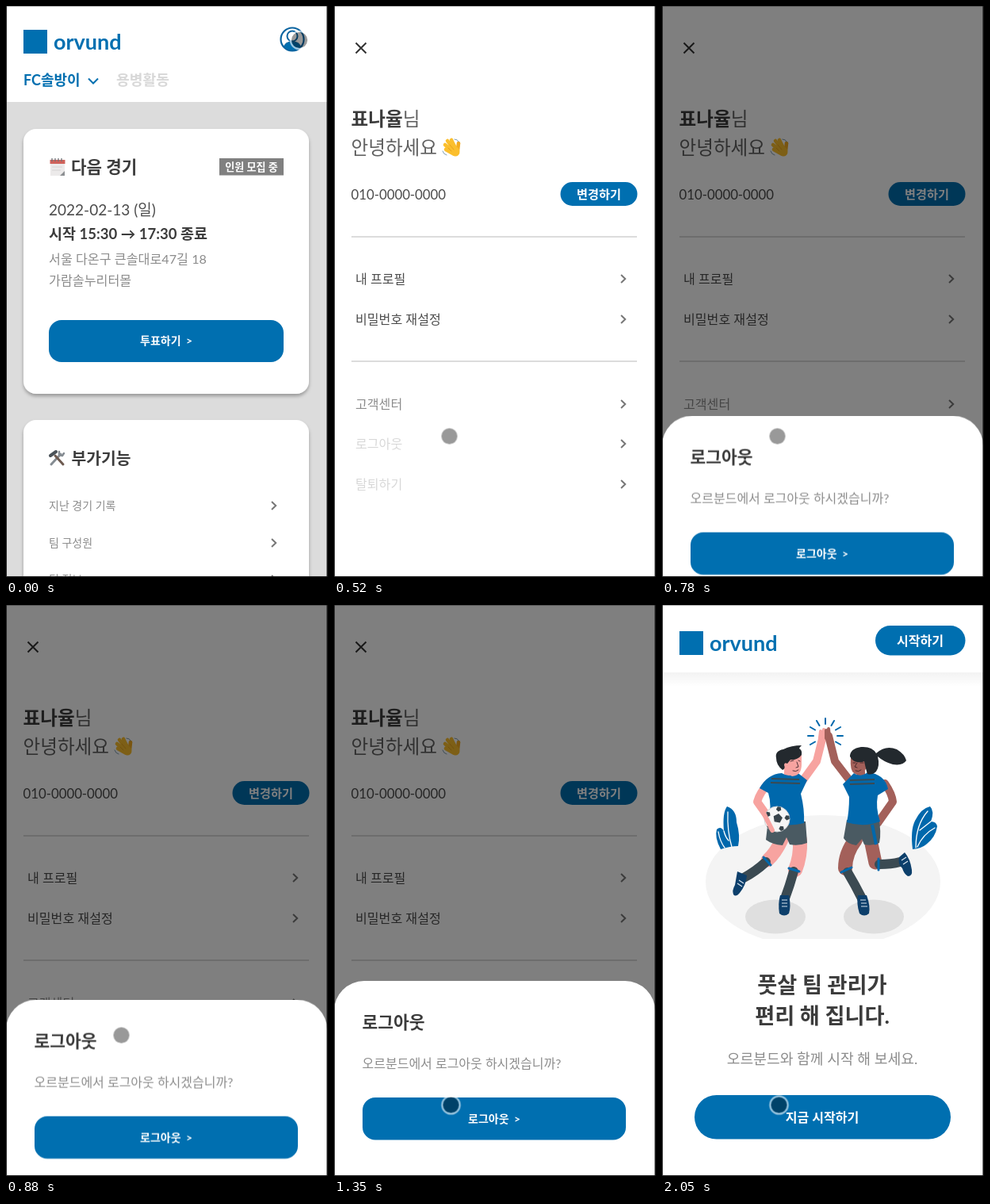
An HTML page for the animation above (2.42 s loop, 406 by 720 pixels).

```html
<!DOCTYPE html>
<html lang="ko">
<head>
<meta charset="utf-8">
<title>Logout flow</title>
<style>
html, body { margin: 0; width: 100%; height: 100%; overflow: hidden; background: #fff; }
svg { display: block; width: 100vw; height: 100vh; }
text { font-family: Lato, "Noto Sans CJK KR", "Noto Sans KR", "Noto Sans CJK", sans-serif; white-space: pre; }
.b { font-weight: 700; }
.c { text-anchor: middle; }
.dark { fill: #3c3c3c; }
.soft { fill: #4c4c4c; }
.thin { fill: #606060; font-weight: 300; }
.mid { fill: #8c8c8c; }
.pale { fill: #d8d8d8; }
.white { fill: #fff; }
.blue { fill: #006fb0; }
.line { fill: none; stroke-linecap: round; stroke-linejoin: round; }
.pink { stroke: #f7a3a0; }
.brown { stroke: #a3605a; }
.sock { stroke: #3b4a52; }
.band { stroke: #0068ac; stroke-width: 3; }
.shoe { fill: #0d3f6b; }
.shirt { fill: #0068ac; }
.shorts { fill: #4a5a62; }
.hair { fill: #23292e; }
</style>
</head>
<body>
<svg viewBox="0 0 406 720" preserveAspectRatio="none">
<defs>
  <path id="go" d="M-3-5 2.2 0-3 5" fill="none" stroke="#777" stroke-width="2"/>
  <g id="logo">
    <rect x="22" y="30" width="30" height="30" class="blue"/>
    <text x="60" y="55" font-size="27" class="b blue">orvund</text>
  </g>
  <filter id="blur" x="-10%" y="-10%" width="120%" height="130%">
    <feDropShadow dx="0" dy="3" stdDeviation="2" flood-opacity=".3"/>
  </filter>
  <linearGradient id="fade" x2="0" y2="1">
    <stop stop-color="#000" stop-opacity=".05"/><stop offset="1" stop-color="#000" stop-opacity="0"/>
  </linearGradient>
  <clipPath id="floor"><rect y="240" width="406" height="181"/></clipPath>
</defs>

<g id="home">
  <rect width="406" height="720" fill="#dcdcdc"/>
  <rect width="406" height="121" class="white"/>
  <use href="#logo"/>
  <g class="blue" stroke="#0b64a0">
    <circle cx="361" cy="42" r="14.500" fill="#fff" stroke-width="2.200"/>
    <path d="M350.500 51q2-6 10.500-6t10.500 6q-4 5-10.500 5t-10.500-5z"/>
    <circle cx="361" cy="38" r="6.500" fill="#fff" stroke-width="2"/>
  </g>
  <text x="22" y="100" font-size="18" class="b blue">FC솔방이</text>
  <path d="M104 91.500l6 6 6-6" fill="none" stroke="#006fb0" stroke-width="2"/>
  <text x="139" y="100" font-size="18.200" class="b pale">용병활동</text>

  <rect x="22" y="155" width="360" height="334" rx="16" class="white" filter="url(#blur)"/>
  <g id="calendar">
    <path d="M56 196h18v13l-5 5H56z" fill="#eceaea"/>
    <path d="M74 208v6h-6z" fill="#8c8f92"/>
    <path d="M55.500 194h19v5h-19z" fill="#cf625b"/>
    <path d="M58 192v4m4-4v4m4-4v4m4-4v4" stroke="#6c7176" stroke-width="1.300"/>
    <path d="M58 203h13m-13 4h11" stroke="#d6d3d3"/>
  </g>
  <text x="82" y="211" font-size="21.200" class="b dark">다음 경기</text>
  <rect x="269" y="192" width="81" height="21.500" fill="#808080"/>
  <text x="309.500" y="207.500" font-size="13.100" class="b white c">인원 모집 중</text>
  <text x="54" y="264" font-size="19" class="soft">2022-02-13 (일)</text>
  <text x="54" y="294" font-size="18.500" class="b dark">시작 15:30 → 17:30 종료</text>
  <text x="54" y="324.500" font-size="16.200" class="mid">서울 다온구 큰솔대로47길 18</text>
  <text x="54" y="352" font-size="16.200" class="mid">가람솔누리터몰</text>
  <rect x="54" y="396" width="296" height="53" rx="16" class="blue"/>
  <text x="169" y="426.500" font-size="14" class="b white">투표하기</text>
  <text x="227" y="426.500" font-size="14" class="b white">&gt;</text>

  <rect x="22" y="522" width="360" height="240" rx="16" class="white" filter="url(#blur)"/>
  <g class="line" stroke="#858c92" stroke-width="3">
    <path d="M57 578l12-13"/>
    <path d="M67 562v4l4 1 2-3" stroke-width="2.500"/>
    <path d="M72 578l-10-11" stroke="#6d5a50"/>
    <path d="M56 567l7-5" stroke="#4b5359" stroke-width="4"/>
  </g>
  <text x="82.500" y="577.500" font-size="20.400" class="b dark">부가기능</text>
  <g font-size="14" class="mid">
    <text x="54" y="635">지난 경기 기록</text>
    <text x="54" y="681.500">팀 구성원</text>
    <text x="54" y="728">팀 정보</text>
  </g>
  <use href="#go" x="338" y="630"/><use href="#go" x="338" y="677"/><use href="#go" x="338" y="723"/>
</g>

<g id="menu">
  <rect width="406" height="720" class="white"/>
  <path d="M27.500 46.500l13 13m0-13l-13 13" stroke="#333" stroke-width="2"/>
  <text x="21.500" y="151" font-size="23.600" class="thin"><tspan class="b dark">표나율</tspan>님</text>
  <text x="21.500" y="187" font-size="23.600" class="thin">안녕하세요</text>
  <g class="line" stroke="#fbbf2d" stroke-width="4.600" transform="translate(147 178)">
    <path d="M2 5l-9-8M4 3l-8-11M6 1l-5-10M1 7l-7-4"/>
    <path d="M9 4l1-9" stroke="#f3ac20"/>
    <ellipse cx="5" cy="5" rx="6" ry="5" fill="#fbbf2d" stroke-width="2" transform="rotate(45 5 5)"/>
    <path d="M-3 1l4 4M-1-3l5 6" stroke="#e29a1b" stroke-width=".8"/>
    <path d="M-10 5q1 4 5 5M5-10q4 0 5 3" stroke="#7f9fb3" stroke-width="1"/>
  </g>
  <text x="21.500" y="243.500" font-size="16.800" class="soft">010-0000-0000</text>
  <rect x="285.500" y="222" width="97" height="30" rx="15" class="blue"/>
  <text x="334" y="242.500" font-size="15.200" class="b white c">변경하기</text>
  <path d="M22 291h360M22 448h360" stroke="#dcdcdc" stroke-width="2"/>
  <g font-size="16.100">
    <text x="27" y="350" class="soft">내 프로필</text>
    <text x="27" y="401" class="soft">비밀번호 재설정</text>
    <text x="27" y="508" class="mid">고객센터</text>
    <text x="27" y="609" class="pale">탈퇴하기</text>
    <g id="logout"><text x="27" y="558" class="pale">로그아웃</text><use href="#go" x="365" y="552"/></g>
  </g>
  <use href="#go" x="365" y="344"/><use href="#go" x="365" y="395"/>
  <use href="#go" x="365" y="502"/><use href="#go" x="365" y="603"/>
</g>

<rect id="shade" width="406" height="720" opacity="0" fill-opacity=".5"/>

<g id="sheet">
  <path d="M0 720V512a38 38 0 0 1 38-38H367a38 38 0 0 1 38 38V720z" class="white"/>
  <text x="35.500" y="534" font-size="21.500" class="b dark">로그아웃</text>
  <text x="35.500" y="584" font-size="16" class="mid">오르분드에서 로그아웃 하시겠습니까?</text>
  <rect x="36" y="621" width="332" height="53.500" rx="16" class="blue"/>
  <text x="169" y="652.500" font-size="14" class="b white">로그아웃</text>
  <text x="227" y="652.500" font-size="14" class="b white">&gt;</text>
</g>

<g id="landing">
  <rect width="406" height="720" class="white"/>
  <rect y="85" width="406" height="18" fill="url(#fade)"/>
  <use href="#logo" y="3"/>
  <rect x="269" y="26" width="113.500" height="37.500" rx="18.700" class="blue"/>
  <text x="325.500" y="50.500" font-size="16.100" class="b white c">시작하기</text>

  <g id="art">
    <ellipse cx="203" cy="349" rx="148" ry="84" fill="#f4f4f4" clip-path="url(#floor)"/>
    <g fill="#dfdfdf"><ellipse cx="143" cy="393" rx="38" ry="21.500"/><ellipse cx="267" cy="393" rx="38" ry="21.500"/></g>
    <g id="burst" class="line" stroke="#0068ac" stroke-width="2"></g>
    <g class="shirt">
      <path d="M74 308q-8-15-5-25 5-5 9 2-2-23 4-31 12 4 12 20 5 16 2 30-10 0-22 4z"/>
      <path d="M316 308q-3-24 3-36 8-16 19-18 6 6 1 19 7 0 8 6-2 14-14 23-6 5-17 6z"/>
    </g>
    <g class="line" stroke="#fff" stroke-width="1.300">
      <path d="M83 261q-1 24 5 44M71 286q2 12 8 20M78 285q2 8 6 12"/>
      <path d="M335 260q-15 17-15 46M344 281q-15 8-22 24M339 273l-14 11"/>
    </g>

    <g id="man">
      <g class="line">
        <path d="M134 225q-11 12-14 23l17 24" class="pink" stroke-width="10"/>
        <path d="M177 222l18-25 8-32" class="pink" stroke-width="10"/>
        <path d="M199 168l1-9m3 7l1-9m3 9l-1-7" class="pink" stroke-width="4"/>
        <path d="M151 296q-8 17-18 26" class="pink" stroke-width="17"/>
        <path d="M174 296q1 21-6 38" class="pink" stroke-width="18"/>
        <path d="M131 324q-13 12-28 20" class="sock" stroke-width="12"/>
        <path d="M166 336q-5 18-11 34" class="sock" stroke-width="12"/>
        <path d="M128 318l9 10M160 332l13 4" class="band"/>
        <path d="M160 205l-1 12" class="pink" stroke-width="11"/>
      </g>
      <path d="M95 336l12 5q-1 12-9 22-5 6-8 2-2-5 2-12z" class="shoe"/>
      <path d="M149 366h11q3 14 0 23-6 5-12 0-2-12 1-23z" class="shoe"/>
      <path d="M97 347l6 4m-8 0l6 4M151 372h7m-7 4h7m-7 4h7" stroke="#d8e4ee" stroke-width="1.200"/>
      <path d="M134 270l47 3 2 27q-10 4-22 2l-4-9-5 10q-13-1-21-7z" class="shorts"/>
      <path d="M151 212q11 7 18-2l14 11-8 17q5 20 4 37-23 6-45-3 5-19 0-35l-11-6q10-18 28-19z" class="shirt"/>
      <path d="M138 219l35 1m-36 4l37 1" stroke="#3b4a52" stroke-width="2"/>
      <path d="M150 192q0 18 14 24 12-1 12-15v-13z" fill="#f7a3a0"/>
      <path d="M152 208q-8-6-8-15-2-9 9-11 10-5 23-5-3 3-3 4 4 2 3 8-5 7-14 6l-4 5q-4-2-4 2 2 4-2 6z" class="hair"/>
      <path d="M162 197l4-1m6 0l2 1m-4 1l2 6-3 1m-4 4q4 2 7-1" class="line" stroke="#51343a"/>
      <circle cx="145" cy="270" r="16" fill="#f5f5f5" stroke="#cfd3d6"/>
      <g id="patches" fill="#37434a"></g>
      <path d="M128 262l6 12 5 10" class="line pink" stroke-width="6"/>
    </g>

    <g id="woman">
      <g class="line">
        <path d="M281 225q9 13 10 23l-19 27" class="brown" stroke-width="10"/>
        <path d="M238 223l-20-26-8-32" class="brown" stroke-width="10"/>
        <path d="M207 168v-10m4 8l-1-10" class="brown" stroke-width="4"/>
        <path d="M244 296q-13 17-13 36" class="brown" stroke-width="18"/>
        <path d="M263 296l6 29" class="brown" stroke-width="17"/>
        <path d="M274 327q15 0 26-3" class="sock" stroke-width="12"/>
        <path d="M234 337q9 15 18 33" class="sock" stroke-width="12"/>
        <path d="M273 320v14M226 337l13-6" class="band"/>
        <path d="M250 205l1 12" class="brown" stroke-width="11"/>
      </g>
      <path d="M299 318l7-6q7 8 9 22 1 8-5 8-5-3-7-10-6-5-4-14z" class="shoe"/>
      <path d="M247 366h11q5 14 3 23-6 5-12 0-4-12-2-23z" class="shoe"/>
      <path d="M302 322l6-4m-4 9l6-4M250 372h7m-6 4h7m-7 4h8" stroke="#d8e4ee" stroke-width="1.200"/>
      <path d="M233 271l40-2q4 17 1 31-9 4-19 2l-3-7-7 8q-12-2-16-9z" class="shorts"/>
      <path d="M265 277l5 25" stroke="#0068ac" stroke-width="4"/>
      <path d="M242 212q8 6 17-1 22 2 26 21l-13 8q-3 16 3 33-21 8-42 1 3-14 3-32l-8-16z" class="shirt"/>
      <path d="M237 221l31-1m-31 6l31-1" stroke="#3b4a52" stroke-width="2"/>
      <path d="M239 187q-3 15 1 23 6 7 15 0l9-15-5-11z" fill="#a3605a"/>
      <path d="M237 191q0-10 14-12 14-1 19 8 12-11 26-5 10 6 12 14-4 7-17 5-11-3-19-10 3 12-2 19-5 5-11 3-2-6-4-16-4 2-9 1-6-1-9-7z" class="hair"/>
      <path d="M241 199h3m6 0h4m-8 0l-3 5 3 1m-2 4q4 2 7-1" class="line" stroke="#4c292b"/>
    </g>
  </g>

  <g class="b dark c" font-size="27.200">
    <text x="202" y="489">풋살 팀 관리가</text>
    <text x="202" y="528">편리 해 집니다.</text>
  </g>
  <text x="202" y="579" font-size="18.200" class="mid c">오르분드와 함께 시작 해 보세요.</text>
  <rect x="41" y="618" width="323" height="55.500" rx="27.700" class="blue"/>
  <text x="202" y="651.500" font-size="16.100" class="b white c">지금 시작하기</text>
</g>

<g id="pointer">
  <circle r="10.200" fill-opacity=".4"/>
  <circle r="11.200" fill="none" stroke="#fff" stroke-opacity=".6" stroke-width="2.200"/>
</g>
<g id="bezel">
  <path d="M0 .5H406" stroke="#000" stroke-opacity=".3"/>
  <path d="M.5 0V720M0 719.500H406" stroke="#222"/>
  <path d="M405.200 0V720" stroke="#111" stroke-width="1.600"/>
</g>
</svg>
<script>
const LOOP = 2420;
const $ = id => document.getElementById(id);
const polar = (cx, cy, r, deg) => {
  const a = deg * Math.PI / 180;
  return [cx + r * Math.cos(a), cy + r * Math.sin(a)];
};

let rays = '';
for (let a = -210; a <= 30; a += 30) {
  rays += `<path d="M${polar(206, 165, 15, a)}L${polar(206, 165, 22, a)}"/>`;
}
$('burst').innerHTML = rays;

const pentagon = (x, y, r, turn) =>
  `<path d="M${[0, 1, 2, 3, 4].map(i => polar(x, y, r, turn + i * 72)).join('L')}z"/>`;
let patches = pentagon(146, 269, 6, -80);
for (let i = 0; i < 5; i++) {
  const [x, y] = polar(145, 270, 13, i * 72 - 80);
  patches += pentagon(x, y, 3.4, i * 72 + 100);
}
$('patches').innerHTML = patches;

// Each step: [ms, value, easing towards the next step]
function play(id, prop, steps) {
  const keys = steps.map(([ms, value, easing = 'step-end']) =>
    ({ offset: ms / LOOP, [prop]: value, easing }));
  keys.push({ offset: 1, [prop]: steps[steps.length - 1][1] });
  $(id).animate(keys, { duration: LOOP, iterations: Infinity });
}
const at = (x, y) => `translate(${x}px, ${y}px)`;

play('menu', 'transform', [
  [0, at(406, 0)],
  [20, at(406, 0), 'cubic-bezier(0,.78,.5,1)'],
  [210, at(0, 0)]
]);
play('logout', 'opacity', [[0, 1], [530, .2]]);
play('shade', 'opacity', [[0, 0], [550, 1]]);
play('sheet', 'transform', [
  [0, at(0, 246)],
  [550, at(0, 246), 'cubic-bezier(0,.78,.5,.86)'],
  [1050, at(0, 0)]
]);
play('landing', 'visibility', [[0, 'hidden'], [1440, 'visible']]);
play('art', 'opacity', [[0, 0], [1650, 1]]);
play('pointer', 'transform', [
  [0, at(370, 43)],
  [240, at(370, 43), 'ease-in-out'],
  [520, at(145.5, 542.5)],
  [940, at(145.5, 542.5), 'ease-in-out'],
  [1080, at(144, 586), 'ease-out'],
  [1360, at(147.5, 630.5)]
]);
</script>
</body>
</html>
```
